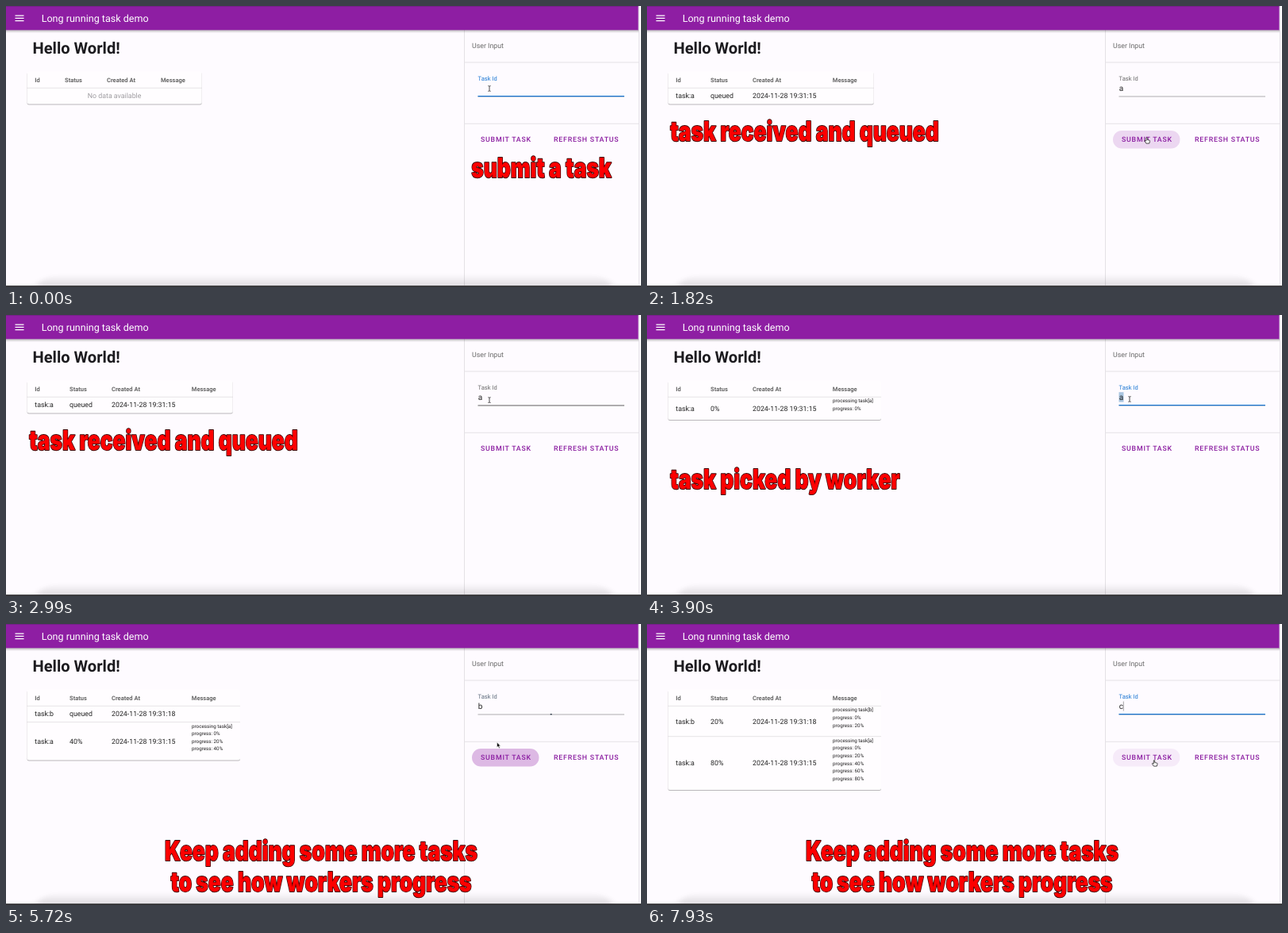
An HTML page that plays this animation: 800x354 px, repeating every 8000 ms.

```html
<!DOCTYPE html>
<html lang="en">
<head>
<meta charset="utf-8">
<title>Long running task demo</title>
<style>
  html, body { margin: 0; width: 100%; height: 100%; overflow: hidden; background: #fefbff; }
  svg { display: block; width: 800px; height: 354px; font-family: Roboto, sans-serif; }
  text { white-space: pre; text-rendering: geometricPrecision; }
  .title { font-size: 12.56px; fill: #fff; }
  .heading { font-size: 20.1px; font-weight: 700; fill: #1c1b1f; }
  .th { font-size: 7.54px; font-weight: 700; fill: #666; }
  .td { font-size: 8.8px; fill: #222; }
  .muted { font-size: 8.8px; fill: #696969; }
  .none { font-size: 8.8px; fill: #9e9ca0; }
  .log { font-size: 6.28px; fill: #222; }
  .label { font-size: 7.54px; }
  .value { font-size: 10.05px; fill: #222; }
  .button { font-size: 8.8px; font-weight: 500; letter-spacing: .785px; fill: #8a1ca0; }
  .caption { font: 900 34.4px Inter, Roboto, sans-serif; fill: #fe0000; stroke: #3a0606;
             stroke-width: 1.9px; stroke-linejoin: round; paint-order: stroke; text-anchor: middle; }
  .card { fill: #fffdff; filter: drop-shadow(0 1px .6px rgba(0,0,0,.27)); }
  .rule { stroke: #000; stroke-opacity: .13; stroke-width: .8; }
</style>
</head>
<body>
<svg viewBox="0 0 800 354">
  <defs>
    <filter id="soft" x="-10%" y="-100%" width="120%" height="300%"><feGaussianBlur stdDeviation="4 2"/></filter>
    <linearGradient id="dock" x2="0" y2="1">
      <stop offset="0" stop-opacity="0"/><stop offset="1" stop-opacity=".13"/>
    </linearGradient>
    <linearGradient id="drop" x2="0" y2="1">
      <stop offset="0" stop-opacity=".28"/><stop offset="1" stop-opacity="0"/>
    </linearGradient>
    <clipPath id="pill"><rect x="587" y="157" width="84.5" height="22.6" rx="11.3"/></clipPath>
  </defs>
  <rect width="800" height="354" fill="#fefbff"/>
  <path d="M38 354Q44 340 70 338H734Q759 340 765 354Z" fill="url(#dock)" filter="url(#soft)"/>
  <path class="rule" d="M577.5 30V352M578 71H797M578 148.3H797" fill="none"/>
  <rect y="30" width="797" height="4" fill="url(#drop)"/>
  <rect width="796.6" height="30.3" fill="#8e1ea3"/>
  <rect width="796.6" height="1" fill="#45245a" opacity=".35"/>
  <path d="M797.5 0V352" stroke="#dedbe1" stroke-width=".8"/>
  <rect y="352.3" width="800" height="1.7" fill="#2c2b2e"/>
  <path d="M11.5 12.2h11M11.5 15.4h11M11.5 18.6h11" stroke="#fff" stroke-width="1.3"/>
  <text class="title" x="44.7" y="20.2">Long running task demo</text>
  <text class="heading" x="33.5" y="60">Hello World!</text>
  <text class="muted" x="587" y="53.3">User Input</text>
  <g id="live"></g>
</svg>
<script>
const LOOP = 8000, STEP = 130, FIRST = 260;
const live = document.getElementById('live');

// time, progress of task a, progress of task b (-1 = queued)
const TABLE = [[0], [1820, -1], [3900, 0], [4680, 20], [5590, 40, -1], [6630, 60, 0], [7540, 80, 20]];
const CREATED = { a: '2024-11-28 19:31:15', b: '2024-11-28 19:31:18' };

// time, centre x, baseline, lines
const CAPTIONS = [
  [0, 674.5, 216, 'submit a task'],
  [1820, 198.5, 170, 'task received and queued'],
  [3900, 174, 219, 'task picked by worker'],
  [4680, 250.5, 176, 'status is being updated by worker'],
  [5590],
  [5720, 397, 297.5, 'Keep adding some more tasks', 'to see how workers progress']
];

const TYPED = [[0, ''], [780, 'a'], [4290, 'b'], [7280, 'c']];
const SELECTED = [[0, false], [3510, true], [4290, false], [6760, true], [7280, false]];
const FOCUS = [[-1000, 1368], [3120, 5468], [6500, 9000]];
const PRESSES = [[1368, 629.5, 168.5], [5440, 623, 165]];

const POINTER = [
  [0, 609, 104], [780, 609, 104], [1170, 627, 161], [1430, 629.5, 165.5], [1820, 629.5, 165.5],
  [2470, 609, 108], [3120, 609, 107], [3770, 608, 106], [4290, 608, 106], [4940, 624.5, 156.5],
  [5200, 624, 163], [5460, 623, 164], [5720, 618.5, 149], [6240, 609, 106], [7280, 609, 106],
  [7670, 634, 158], [7930, 639, 171.5]
];

const at = (list, t) => list.filter(row => row[0] <= t).pop();
const clamp = v => Math.max(0, Math.min(1, v));
const text = (cls, x, y, s, extra = '') => `<text class="${cls}" x="${x}" y="${y}" ${extra}>${s}</text>`;
const rule = (y, right) => `<path class="rule" d="M26.5 ${y}H${right}"/>`;
const mix = (from, to, k) => `rgb(${from.map((v, i) => Math.round(v + (to[i] - v) * k))})`;

function pointerAt(t) {
  const i = Math.max(0, POINTER.findLastIndex(p => p[0] <= t));
  const a = POINTER[i], b = POINTER[i + 1] || a;
  const p = b === a ? 0 : (t - a[0]) / (b[0] - a[0]);
  const k = p * p * (3 - 2 * p);
  return [a[1] + (b[1] - a[1]) * k, a[2] + (b[2] - a[2]) * k];
}

function taskRow(id, progress, top) {
  const queued = progress < 0;
  const log = queued ? [] : [`processing task[${id}]`];
  for (let p = 0; p <= progress; p += 20) log.push(`progress: ${p}%`);
  const height = queued ? 20.3 : (log.length + 1) * 9.6;
  const base = top + height / 2 + 3;
  const svg = text('td', 36.3, base, 'task:' + id)
    + text('td', 80, base, queued ? 'queued' : progress + '%')
    + text('td', 133, base, CREATED[id])
    + log.map((s, i) => text('log', 234, top + 7 + i * 9.6, s)).join('');
  return { svg, bottom: top + height };
}

function table(t) {
  const [, a, b] = at(TABLE, t);
  const empty = a === undefined;
  const right = empty ? 246.7 : a < 0 ? 285.7 : 295;
  const columns = empty ? [36.3, 74, 127, 195] : [36.3, 80, 133, 233.8];
  let body = '', y = 103.3;
  const add = (id, progress) => {
    const row = taskRow(id, progress, y);
    body += rule(y, right) + row.svg;
    y = row.bottom;
  };
  if (empty) {
    body = rule(y, right) + text('none', 136.6, 116.3, 'No data available', 'text-anchor="middle"');
    y += 20.3;
  } else {
    if (b !== undefined) add('b', b);
    add('a', a);
  }
  const head = ['Id', 'Status', 'Created At', 'Message'].map((s, i) => text('th', columns[i], 96, s)).join('');
  return `<rect class="card" x="26.5" y="82.5" width="${right - 26.5}" height="${y - 82.5}" rx="2.5"/>` + head + body;
}

function field(t, hover) {
  const [start, end] = at(FOCUS, t);
  const focused = t < end;
  const fade = focused ? 0 : clamp((t - end) / 300);
  const grown = focused ? 1 - (1 - clamp((t - start) / 300)) ** 2.5 : (1 - fade) ** 2.5;
  const blue = [25, 118, 210];
  const [typedAt, value] = at(TYPED, t);
  const selected = at(SELECTED, t)[1];
  let svg = text('label', 594.6, 93.6, 'Task Id', `fill="${mix(blue, [105, 105, 105], fade)}"`);
  if (selected) svg += '<rect x="594.5" y="97.2" width="6" height="12.4" fill="#a9c5e0"/>';
  svg += text('value', 594.7, 107.3, value);
  if (focused && value && !selected && (t - typedAt) % 1060 < 700)
    svg += '<path d="M600.3 97.5V109.5" stroke="#666" stroke-width=".6"/>';
  svg += `<path d="M594.5 114H779" stroke="#000" stroke-opacity="${hover && !focused ? .8 : .4}" stroke-width=".8"/>`;
  if (grown > .002) {
    const half = 92.2 * grown;
    svg += `<path d="M${686.7 - half} 113.7H${686.7 + half}" stroke="${mix(blue, [30, 30, 30], fade)}" stroke-width="1.3"/>`;
  }
  return svg;
}

function buttons(t, hover) {
  const press = at(PRESSES, t);
  const age = press ? t - press[0] : 9999;
  const fade = 1 - clamp((age - 320) / 260);
  const base = Math.max(hover ? .07 : 0, .13 * fade);
  let svg = '<g clip-path="url(#pill)" fill="#8e1ea3">';
  if (base) svg += `<rect x="587" y="157" width="84.5" height="23" opacity="${base}"/>`;
  if (fade) svg += `<circle cx="${press[1]}" cy="${press[2]}" r="${4 + .18 * age}" opacity="${.19 * fade}"/>`;
  return svg + '</g>' + text('button', 598, 171.4, 'SUBMIT TASK') + text('button', 690, 171.4, 'REFRESH STATUS');
}

function caption(t) {
  const [, x, y, ...lines] = at(CAPTIONS, t);
  return lines.map((s, i) =>
    `<text class="caption" transform="translate(${x} ${y + i * 39.5}) scale(.765 1)">${s}</text>`).join('');
}

const SHAPES = {
  beam: '<path d="M-1.6-3.4Q0-3.4 0-2.6Q0-3.4 1.6-3.4M0-2.6V2.6M-1.6 3.4Q0 3.4 0 2.6Q0 3.4 1.6 3.4" fill="none" stroke="#222" stroke-width=".8"/>',
  arrow: '<path d="M0 0V6.4L1.5 5.1 2.6 7.5 3.7 7 2.6 4.7H4.6Z" fill="#111" stroke="#fff" stroke-width=".5"/>',
  hand: '<path d="M-.7.4Q0-.4.7.4V3L3.6 3.7Q4.2 4 4 5L3.3 7.6H-.6L-2.6 4.6Q-2.6 3.6-1.5 4L-.7 4.7Z" fill="#fff" stroke="#222" stroke-width=".8"/>'
};

function draw(t) {
  const [x, y] = pointerAt(t);
  const overField = x > 594 && x < 779 && y > 84 && y < 117;
  const overButton = x > 587 && x < 671 && y > 157 && y < 180;
  const shape = SHAPES[overField ? 'beam' : overButton ? 'hand' : 'arrow'];
  live.innerHTML = table(t) + field(t, overField) + buttons(t, overButton) + caption(t)
    + `<g transform="translate(${x} ${y})">${shape}</g>`;
}

let shown = -1;
const origin = performance.now();
function tick() {
  const t = (performance.now() - origin) % LOOP;
  const step = t < FIRST ? 0 : FIRST + Math.floor((t - FIRST) / STEP) * STEP;
  if (step !== shown) draw(shown = step);
  requestAnimationFrame(tick);
}
tick();
</script>
</body>
</html>
```
